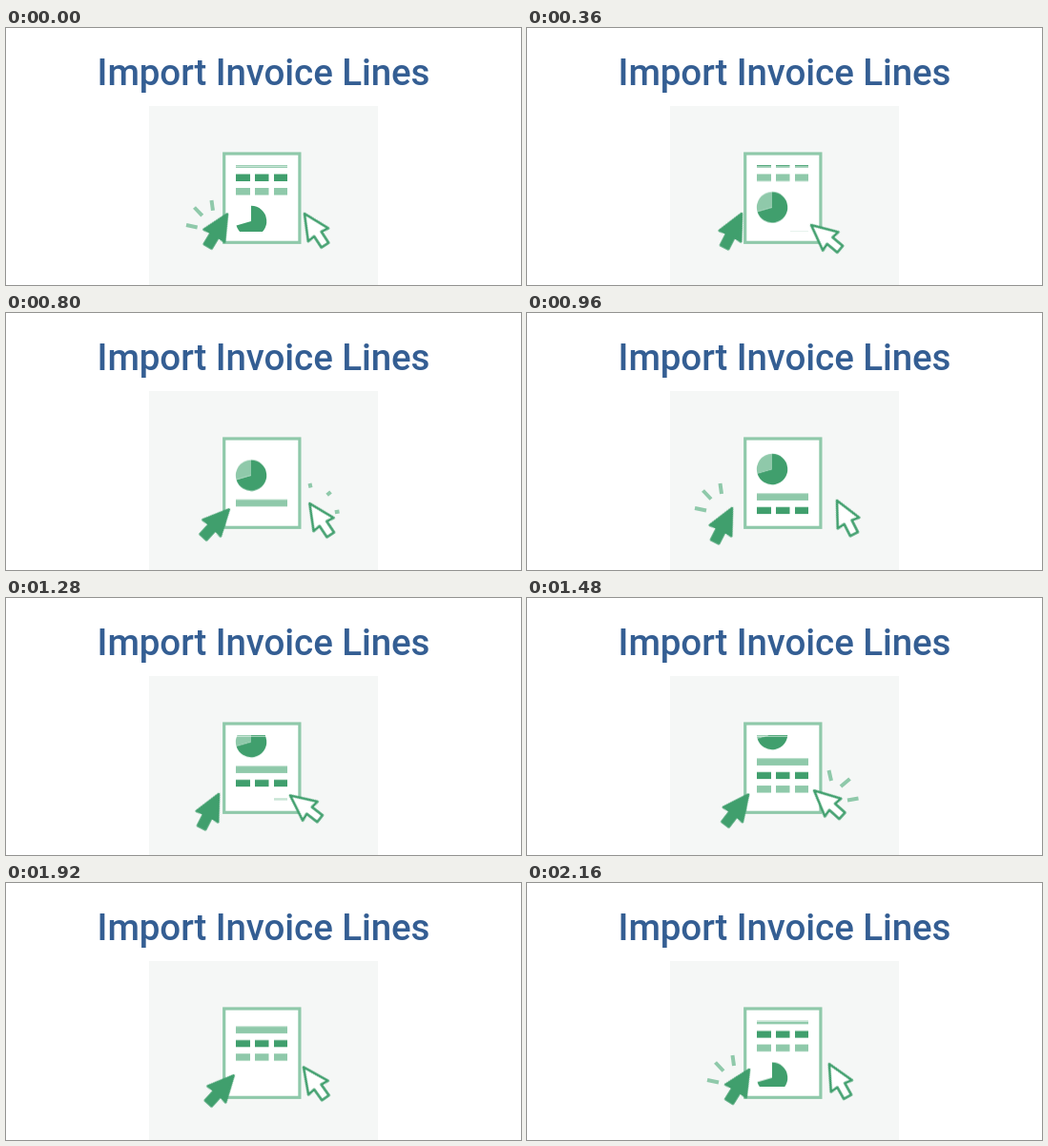
Write an HTML page without scripts that moves like this. It is 540 by 270 pixels and loops after 2200 ms.

```html
<!DOCTYPE html>
<html lang="en">
<head>
<meta charset="utf-8">
<title>Import Invoice Lines</title>
<style>
  html, body { margin: 0; width: 100%; height: 100%; overflow: hidden; background: #fff; }
  svg { display: block; width: 540px; height: 270px; }
  :root { --dark: #409f6d; --light: #8fc9aa; }

  .title { font: 500 38.5px Roboto, Inter, sans-serif; letter-spacing: -.1px; fill: #345e93; text-anchor: middle; }
  .panel { fill: #f5f7f6; }
  .page { fill: #fff; stroke: var(--light); stroke-width: 3.2; }
  .dark { fill: var(--dark); }
  .light { fill: var(--light); }

  .strip, .cursor, .rays, .enter { animation: 2200ms linear infinite; }

  /* page contents rise by one full set per loop */
  .strip { animation-name: rise; }
  @keyframes rise { to { transform: translateY(-89px); } }

  .bar { animation-name: bar-in; }
  @keyframes bar-in {
    0%, 16.4% { clip-path: inset(0 0 0 65%); opacity: .6; }
    20%, 100% { clip-path: inset(0); opacity: 1; }
  }
  .row-dark { animation-name: dark-in; }
  @keyframes dark-in {
    0%, 37% { clip-path: inset(0 100% 0 0); }
    42%, 100% { clip-path: inset(0); }
  }
  .row-light { animation-name: light-in; }
  @keyframes light-in {
    0%, 56% { clip-path: inset(100% 0 0 100%); opacity: .5; }
    58.2% { clip-path: inset(80% 0 0 74%); opacity: .5; }
    63%, 100% { clip-path: inset(0); opacity: 1; }
  }
  .pie { animation-name: pie-in; }
  @keyframes pie-in {
    0%, 88% { opacity: 0; }
    96%, 100% { opacity: 1; }
  }
  .wedge { animation-name: wedge-in; }
  @keyframes wedge-in {
    0%, 3% { opacity: 0; }
    13%, 100% { opacity: 1; }
  }

  .cursor { stroke: var(--dark); stroke-width: 2.6; stroke-linejoin: round; }
  .left { fill: var(--dark); animation-name: left; }
  @keyframes left {
    0%, 100% { transform: translate(232px, 195.5px) rotate(31deg); }
    16.36% { transform: translate(225px, 195px) rotate(27deg); }
    27.27% { transform: translate(231px, 203px) rotate(41deg); }
    33.6% { transform: translate(241px, 207px) rotate(49deg); }
    43.64% { transform: translate(215px, 205px) rotate(27deg); }
    52.7% { transform: translate(217px, 209px) rotate(27deg); }
    58.18% { transform: translate(223px, 206px) rotate(27deg); }
    76.36% { transform: translate(241px, 207px) rotate(48deg); }
    80% { transform: translate(242.5px, 206.5px) rotate(49deg); }
    98.18% { transform: translate(233px, 196px) rotate(32deg); }
  }
  .right { fill: #fff; animation-name: right; }
  @keyframes right {
    0%, 100% { transform: translate(313px, 195px) rotate(-33deg); }
    16.36% { transform: translate(298px, 207px) rotate(-50deg); }
    19% { transform: translate(298px, 207px) rotate(-51deg); }
    27.27% { transform: translate(310px, 204px) rotate(-42deg); }
    43.64% { transform: translate(325px, 197px) rotate(-27deg); }
    48% { transform: translate(325px, 198px) rotate(-27deg); }
    58.18% { transform: translate(298px, 207.5px) rotate(-52deg); }
    61% { transform: translate(297px, 206px) rotate(-52deg); }
    76.36% { transform: translate(307px, 197px) rotate(-42deg); }
    98.18% { transform: translate(317px, 190px) rotate(-29deg); }
  }

  /* click rays shoot outward, then vanish at their far ends */
  .rays {
    fill: none; stroke: var(--light); stroke-width: 4;
    stroke-dasharray: 1 3;
    animation-name: burst; animation-delay: calc(var(--at) - 2200ms);
  }
  @keyframes burst {
    0% { stroke-dashoffset: 1.05; }
    4.5%, 6.5% { stroke-dashoffset: 0; }
    20%, 100% { stroke-dashoffset: -1.05; }
  }
</style>
</head>
<body>
<svg viewBox="0 0 540 270">
  <defs>
    <clipPath id="window"><rect x="236" y="144.8" width="64" height="69"/></clipPath>
    <path id="row" d="M241 0h15v7.5h-15zM261 0h14.5v7.5h-14.5zM281 0h14v7.5h-14z"/>
    <path id="slice" d="M0 0V-16.2A16.2 16.2 0 1 1 -15.5 4.5Z"/>
    <path id="arrow" d="M0 0L12.6 26.5L4.5 25.5V39.5H-4.5V25.5L-12.6 26.5Z"/>
    <g id="rays-left">
      <path pathLength="1" d="M188 207.5L176 205"/>
      <path pathLength="1" d="M193 195.5L184.5 186.5"/>
      <path pathLength="1" d="M204 190L202.5 179"/>
    </g>
    <g id="rays-right">
      <path pathLength="1" d="M321 190L318.5 179"/>
      <path pathLength="1" d="M331 196L340.5 188"/>
      <path pathLength="1" d="M338 210.5L349.5 208.5"/>
    </g>
  </defs>

  <text class="title" x="270" y="59.8">Import Invoice Lines</text>
  <rect class="panel" x="150" y="82" width="240" height="188"/>
  <rect class="page" x="228.7" y="132" width="79.2" height="93.3"/>

  <g clip-path="url(#window)">
    <g class="strip">
      <rect class="light" x="241" y="139.4" width="54" height="7.5"/>
      <use class="dark" href="#row" y="153.6"/>
      <use class="light" href="#row" y="168"/>
      <g transform="translate(257 203)">
        <use class="dark" href="#slice"/>
        <path class="light enter wedge" d="M0 0V-16.2A16.2 16.2 0 0 0 -15.5 4.5Z"/>
      </g>

      <rect class="light enter bar" x="241" y="228.4" width="54" height="7.5"/>
      <g class="enter row-dark"><use class="dark" href="#row" y="242.6"/></g>
      <g class="enter row-light"><use class="light" href="#row" y="257"/></g>
      <g class="enter pie"><use class="dark" href="#slice" x="257" y="292"/></g>
    </g>
    <rect x="236" y="144" width="64" height="2" fill="#fff" opacity=".5"/>
  </g>

  <use class="rays" href="#rays-left" style="--at: 850ms"/>
  <use class="rays" href="#rays-left" style="--at: 2050ms" x="13" y="2"/>
  <use class="rays" href="#rays-right" style="--at: 490ms"/>
  <use class="rays" href="#rays-right" style="--at: 1350ms" x="-2" y="2"/>

  <use class="cursor left" href="#arrow"/>
  <use class="cursor right" href="#arrow"/>
</svg>
</body>
</html>
```
